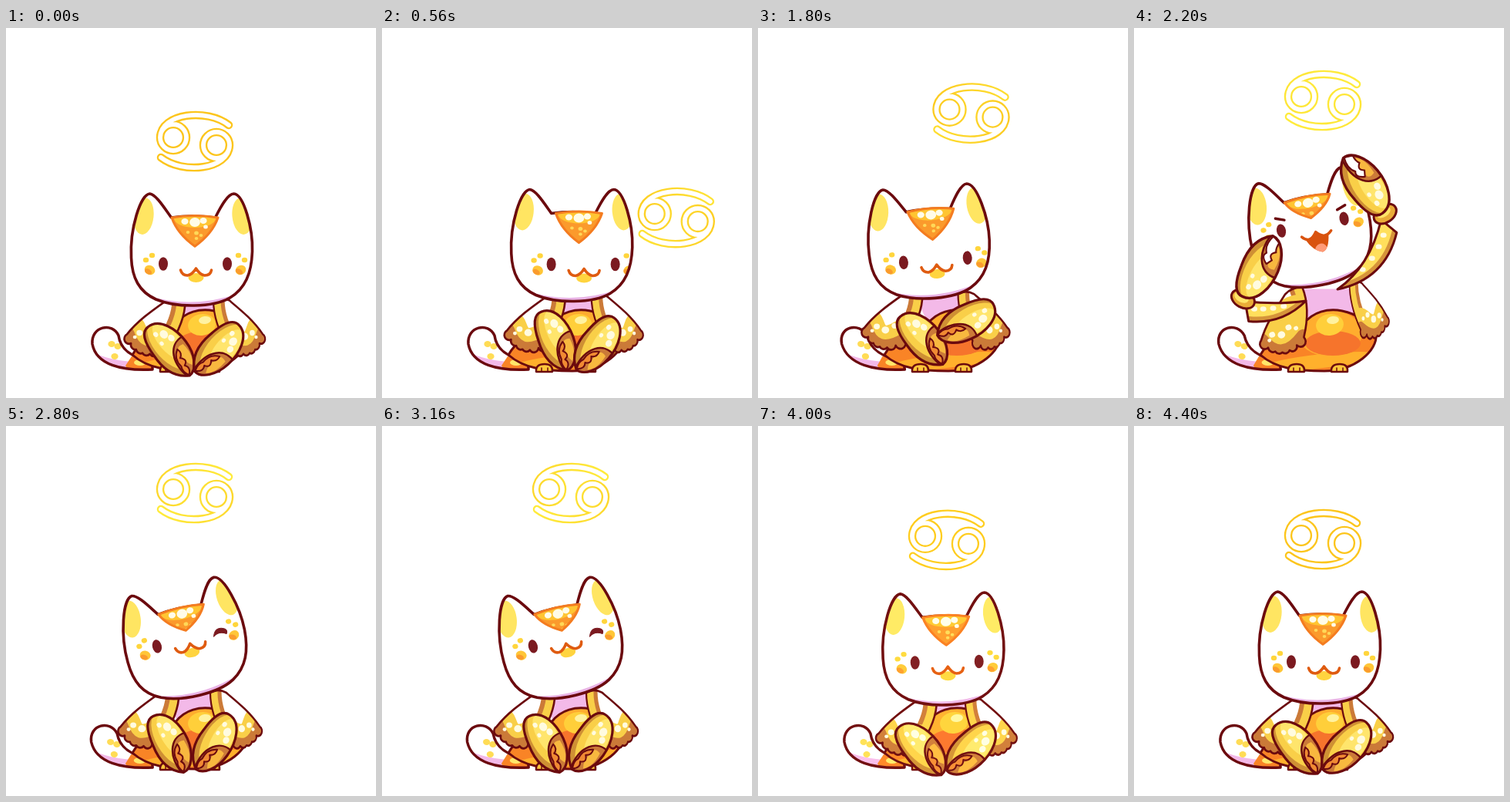
Recreate the animation shown at these times as an HTML page with a canvas. Size 480 px wide and 480 px high, loop 4800 ms.

```html
<!DOCTYPE html>
<html lang="en">
<head>
<meta charset="utf-8">
<title>Crab cat</title>
<style>
html, body { margin: 0; width: 100%; height: 100%; overflow: hidden; background: #fff; }
canvas { display: block; width: 480px; height: 480px; }
</style>
</head>
<body>
<canvas id="stage" width="480" height="480"></canvas>
<script>
const ctx = document.getElementById('stage').getContext('2d');
const LOOP = 4800, STEP = 40, RAD = Math.PI / 180;
const LINE = '#6b0a0e', GOLD = '#f9cf48', LIGHT = '#ffe76a', BROWN = '#cb7a38', ORANGE = '#f98426';
const LILAC = '#f3b9e8', EYE = '#7b1a20', SHINE = '#fffbe0';

// Claws are [x, y, angle, flip]; folded ones mirror each other.
const folded = (mid, gap, y, angle) => ({
  left: [mid - gap, y, angle, 1], right: [mid + gap, y, 180 - angle, 1]
});
const sit = { x: 240.5, y: 290, tilt: 0, faceY: 16, lift: 0, glow: 0, raise: 0, flash: 0, ...folded(244.5, 31.5, 417, 48) };
const peek = { ...sit, x: 251, y: 279, faceY: 28, lift: 18, glow: 1, left: [238, 392, 82, 1], right: [283, 405, 118, 1] };
const play = { ...sit, x: 221.4, y: 280.8, tilt: -4.2, faceY: 21, lift: 41, glow: .4, left: [214, 403, 47, 1], right: [271, 381, 150, 1] };
const cheer = { ...sit, x: 228.6, y: 265, tilt: -11, faceY: -9, lift: 53, glow: .9, raise: 1, left: [163, 311, -62, -1], right: [300, 203, 236, -1] };
const wink = { ...sit, x: 232.4, y: 281.7, tilt: -12.8, faceY: -4, lift: 60, glow: .7, ...folded(242, 29, 411, 60) };
const shine = { ...wink, x: 233.3, y: 278.3, tilt: -13.9, faceY: -6, lift: -11, flash: 1, ...folded(242, 27, 408, 62) };
const land = { ...sit, y: 293, ...folded(244.5, 32.5, 420, 46) };

const poseKeys = [[0, sit], [1120, peek], [1280, peek], [1800, play], [2200, cheer], [2400, cheer],
  [2800, wink], [3200, wink], [3600, shine], [4080, land], [4400, sit]];
const spinKeys = [[0, 0], [800, 90], [1120, -94], [1280, -94], [1640, 38], [1900, 0]];

const ease = u => u * u * (3 - 2 * u);
function blend(a, b, u) {
  if (typeof a === 'number') return a + (b - a) * u;
  if (Array.isArray(a)) return a.map((v, i) => blend(v, b[i], u));
  return Object.fromEntries(Object.keys(a).map(k => [k, blend(a[k], b[k], u)]));
}
function glide(keys, t) {
  const i = keys.findIndex(k => k[0] > t);
  if (i < 0) return keys[keys.length - 1][1];
  const [t0, a] = keys[i - 1], [t1, b] = keys[i];
  return blend(a, b, ease((t - t0) / (t1 - t0)));
}

function shape(d, fill, stroke, width = 3) {
  const p = typeof d === 'string' ? new Path2D(d) : d;
  if (fill) { ctx.fillStyle = fill; ctx.fill(p); }
  if (stroke) { ctx.strokeStyle = stroke; ctx.lineWidth = width; ctx.stroke(p); }
}
function oval(x, y, rx, ry, fill, angle = 0, stroke, width) {
  const p = new Path2D();
  p.ellipse(x, y, rx, ry, angle * RAD, 0, 7);
  shape(p, fill, stroke, width);
}
function dots(list, fill = '#fff') {
  for (const [x, y, r] of list) oval(x, y, r * 1.15, r, fill);
}
function placed(x, y, angle, sx, sy, draw) {
  ctx.save();
  ctx.translate(x, y);
  ctx.rotate(angle * RAD);
  ctx.scale(sx, sy);
  draw();
  ctx.restore();
}
function inside(d, draw) {
  ctx.save();
  ctx.clip(new Path2D(d));
  draw();
  ctx.restore();
}

const TAIL = 'M190 443C150 445 117 437 112 410C110 387 138 381 146 399C148 414 158 427 190 432Z';
function drawTail(shift) {
  // Lean the tip while the root stays put.
  ctx.save();
  ctx.transform(1, 0, -shift / 50, 1, shift * 8.8, 0);
  shape(TAIL, '#fff');
  inside(TAIL, () => {
    shape('M116 422Q140 434 190 434V450H116Z', LILAC);
    shape('M155 438L163 426L200 430V446H160Z', ORANGE);
    oval(174, 434, 8, 4, LIGHT);
    dots([[137, 410, 4], [141, 426, 4], [145, 413, 4]], '#ffdc55');
  });
  shape(TAIL, null, LINE, 3.5);
  ctx.restore();
}

const BELLY = 'M220 384C190 392 172 410 164 424C184 442 212 445 247 445C287 445 316 418 314 398C298 366 244 352 220 384Z';
function drawBody(left, right) {
  shape(`M${left.x} ${left.y - 6}H${right.x}L294 375Q255 366 222 386Z`, LILAC);
  shape(BELLY, ORANGE);
  inside(BELLY, () => {
    oval(244, 432, 76, 9, '#ffb02c', -6);
    oval(254, 396, 42, 30, '#ffad2e');
    oval(258, 409, 36, 16, '#f6742c');
    oval(254, 385, 18, 14, '#ffcf3a', -8);
    oval(258, 379, 8, 5, '#fff2a0', -8);
  });
  shape(BELLY, null, LINE);
  for (const x of [211, 267]) {
    shape(`M${x - 11} 446Q${x - 12} 436 ${x} 436Q${x + 11} 436 ${x + 10} 446Z`, '#ffc63b', LINE, 2.5);
    shape(`M${x - 4} 446V441M${x + 4} 446V441`, null, LINE, 1.5);
  }
}

// The hem is a chain of round bumps along a curve.
const HEM = 'M-74 44Q-58 88-12 62', INNER = 'M-12 62C0 46 14 22 14-4';
let bumps = '';
for (let i = 1; i <= 6; i++) {
  const u = i / 6, v = 1 - u, a = v * v, b = 2 * u * v, c = u * u;
  bumps += `A7 7 0 0 0 ${-74 * a - 58 * b - 12 * c} ${44 * a + 88 * b + 62 * c}`;
}
const SLEEVE = `M-14-4C-35 10-57 24-74 44${bumps}C0 46 14 22 14-4Q0-10-14-4Z`;
function drawSleeve({ x, y, angle, sx, gold }) {
  placed(x, y, angle, sx, .92, () => {
    shape(SLEEVE, '#fff');
    inside(SLEEVE, () => {
      shape(INNER, null, BROWN, 40);
      shape(INNER, null, GOLD, 26);
      shape(HEM, null, GOLD, 62 + gold * 60);
      shape(HEM, null, BROWN, 23);
      dots([[-55, 42, 4], [-42, 47, 5], [-28, 41, 4], [-62, 48, 2.5], [-18, 46, 3]], SHINE);
    });
    shape(SLEEVE, null, LINE);
  });
}

const CLAW = 'M-41 2C-40-17-14-24 6-22C27-20 43-8 42 4C31 20 12 24-8 21C-27 19-42 14-41 2Z';
function drawClaw([x, y, angle, flip], raise) {
  const size = 1 + raise * .06;
  placed(x, y, angle, size, size * flip, () => {
    shape(CLAW, '#cf9034');
    inside(CLAW, () => {
      oval(-4, -4, 39, 20, GOLD);
      oval(-8, -6, 30, 13, '#ffe56c');
      shape('M-1-26C-8-6 10 12 44 6V-30Z', BROWN, LINE, 2.5);
      shape('M6-17Q2-6 12-7Q24-2 34-8Q26-18 6-17Z', '#f8b83f');
      if (raise > .05) shape(`M8-5Q14 6 20 1Q28 8 42 3L38-${3 + raise * 4}Q30-6 26-9Q20-1 15-9Z`, '#fff', LINE, 2);
      else shape('M6-7Q14-9 17-2Q25-9 28 0Q35-5 41 4Q32 8 26 4Q12 5 6-7Z', '#f08a33', LINE, 2);
    });
    dots([[-20, -7, 5], [-10, -11, 4], [-27, 1, 3], [-13, 3, 2.5]], SHINE);
    shape(CLAW, null, LINE, 3.2);
  });
}

// A crescent from the shoulder that widens towards the wrist.
function drawArm([fx, fy], [cx, cy], [x, y, angle], raise) {
  if (raise < .05) return;
  const bx = x - 46 * Math.cos(angle * RAD), by = y - 46 * Math.sin(angle * RAD);
  const ex = bx + 5, ey = by + 16;
  const nx = ey - fy, ny = fx - ex, n = Math.hypot(nx, ny) || 1;
  const side = Math.sign((cx - fx) * nx + (cy - fy) * ny) * 13 * raise / n;
  const ox = nx * side, oy = ny * side;
  const outer = `M${fx} ${fy}Q${cx + ox} ${cy + oy} ${ex + ox} ${ey + oy}`;
  const arm = `${outer}L${ex - ox} ${ey - oy}Q${cx - ox} ${cy - oy} ${fx} ${fy}Z`;
  shape(arm, '#ffdf5c');
  inside(arm, () => {
    shape(outer, null, '#d6943a', 13);
    for (const u of [.4, .58, .74, .88]) {
      const v = 1 - u, along = (a, b, c) => v * v * a + 2 * u * v * b + u * u * c;
      oval(along(fx, cx, ex) - ox * .3, along(fy, cy, ey) - oy * .3, 4, 3.2, SHINE);
    }
  });
  shape(arm, null, LINE);
  oval(bx, by, 11 * raise, 16 * raise, '#e9ac38', angle, LINE, 3);
  oval(bx - 2, by - 2, 6 * raise, 10 * raise, '#ffe468', angle);
}

const HEAD = 'M-26-44C-36-58-46-74-54-75C-66-74-80-30-78 8C-77 34-68 52-46 62C-20 73 28 73 50 60C70 48 78 28 79 0C80-30 68-74 55-75C47-75 38-58 31-44Q0-48-26-44Z';
function drawMouth(kind) {
  if (kind === 'round') {
    oval(0, 21, 8, 7, '#ffd94a');
    oval(0, 12, 5.5, 8, '#cf4d12', 0, '#e8751c', 1.5);
  } else if (kind === 'open') {
    const d = 'M-13 17Q-4 18 2 10Q10 18 18 15Q15 36 6 37Q-6 33-13 17Z';
    shape(d, '#d9530f');
    inside(d, () => oval(5, 34, 8, 8, '#ff9b78'));
    shape('M-17 13Q-8 24 2 10Q12 22 22 12', null, '#d9530f', 3.5);
  } else {
    oval(1, 18, 10, 6, '#ffd43f');
    shape('M-19 8Q-17 15-10 15Q-4 14 1 6Q6 14 12 15Q20 15 21 8', null, '#df5b10', 3.6);
  }
}
function drawFace(x, y, mouth, winking) {
  ctx.save();
  ctx.translate(x, y);
  for (const s of [-1, 1]) {
    dots([[s * 56, -11, 3.2], [s * 64, -5, 3.2]], '#ffd53c');
    oval(s * 59, 8, 7, 6, '#ffc637', s * -25);
    oval(s * 59 - 2, 10, 5, 3.2, '#fa9b2d', 30);
    if (mouth === 'open') shape(`M${s * 46}-17L${s * 35}-13`, null, LINE, 3.5);
    if (s < 0 || !winking) oval(s * 41.5, 0, 6, 8.8, EYE);
  }
  if (winking) shape('M33 4Q37-9 49-3Q53 0 50 4Q41-2 33 4Z', EYE, EYE, 1);
  drawMouth(mouth);
  ctx.restore();
}
function drawHead({ x, y, tilt, faceY }, faceX, mouth, winking) {
  placed(x, y, tilt, 1, 1, () => {
    shape(HEAD, '#fff');
    inside(HEAD, () => {
      oval(-62, -46, 13, 24, '#ffe562', 6);
      oval(66, -46, 13, 24, '#ffe562', -6);
      shape('M-60 56Q0 76 62 54V80H-60Z', '#e9b4e6');
      drawFace(faceX, faceY, mouth, winking);
    });
    shape(HEAD, null, LINE, 3.6);
    const tip = Math.min(-6, faceY * .45 - 14), mid = tip / 2 - 20;
    const patch = `M-30-44Q0-49 30-44Q23 ${mid} 0 ${tip}Q-23 ${mid}-30-44Z`;
    ctx.translate(2 + faceX * .5, 0);
    shape(patch, '#fb9a2c');
    inside(patch, () => {
      oval(0, -43, 27, 12, '#ffc532');
      dots([[0, -38, 6], [-13, -39, 4], [11, -40, 4], [14, -32, 2.5]], '#fffce8');
      dots([[2, -24, 2.5], [-9, -25, 2], [8, -21, 2], [2, -17, 2]], '#ffd858');
    });
    shape(patch, null, '#f47c20', 3);
  });
}

const mix = (a, b, u) => `rgb(${blend(a, b, Math.min(1, u)).map(Math.round)})`;
function drawSign(x, y, glow) {
  const tone = ctx.createLinearGradient(-50, 0, 50, 0), base = [252, 197, 28], bright = [255, 236, 60];
  tone.addColorStop(0, mix(base, bright, glow * glow));
  tone.addColorStop(1, mix(base, bright, glow * 1.6));
  const half = new Path2D('M-45-5C-44-37 16-43 44-21M-45-5A17 17 0 1 0-11-5A17 17 0 1 0-45-5Z');
  for (const [color, width] of [[tone, 10.5], ['#fff', 5.8]])
    for (const turn of [0, 180])
      placed(x, y, turn, 1, 1, () => shape(half, null, color, width));
}

function draw(t) {
  ctx.globalCompositeOperation = 'source-over';
  ctx.fillStyle = '#fff';
  ctx.fillRect(0, 0, 480, 480);
  ctx.lineCap = ctx.lineJoin = 'round';

  const p = glide(poseKeys, t), spin = glide(spinKeys, t) * RAD;
  const hop = t > 1840 && t < 2160 ? 36 * Math.sin((t - 1840) / 320 * Math.PI) : 0;
  const mouth = t >= 640 && t < 1440 ? 'round' : t >= 1960 && t < 2520 ? 'open' : 'smile';
  const winking = t >= 2640 && t < 3960;

  // Shoulders follow the head.
  const shoulder = 347 + (p.y - 279) * .9;
  const left = { x: p.x - 20, y: shoulder + p.raise * 10, angle: -22 * p.raise, sx: .86, gold: p.raise };
  const right = { x: 277 + (p.x - 236) / 2 + p.raise * 14, y: shoulder, angle: 0, sx: p.raise * .17 - .73, gold: 0 };

  drawTail(Math.min(0, (p.x - 240) * .3));
  drawBody(left, right);
  drawSleeve(right);
  drawSleeve(left);
  drawHead(p, 5 + 11 * Math.sin(spin), mouth, winking);
  drawArm([223, 354], [190, 372], p.left, p.raise);
  drawArm([264, 339], [316, 318], p.right, p.raise);
  drawClaw(p.left, p.raise);
  drawClaw(p.right, p.raise);

  // The sign swings on an arc around the cat.
  drawSign(245 + 145 * Math.sin(spin), 300 - (153 + p.lift + hop) * Math.cos(spin), p.glow);

  if (p.flash > 0) {
    ctx.globalCompositeOperation = 'lighter';
    ctx.fillStyle = mix([0, 0, 0], [96, 82, 46], p.flash);
    ctx.fillRect(0, 0, 480, 480);
  }
}

const start = performance.now();
function tick() {
  const t = (performance.now() - start) % LOOP;
  draw(Math.floor(t / STEP) * STEP);
  requestAnimationFrame(tick);
}
tick();
</script>
</body>
</html>
```
